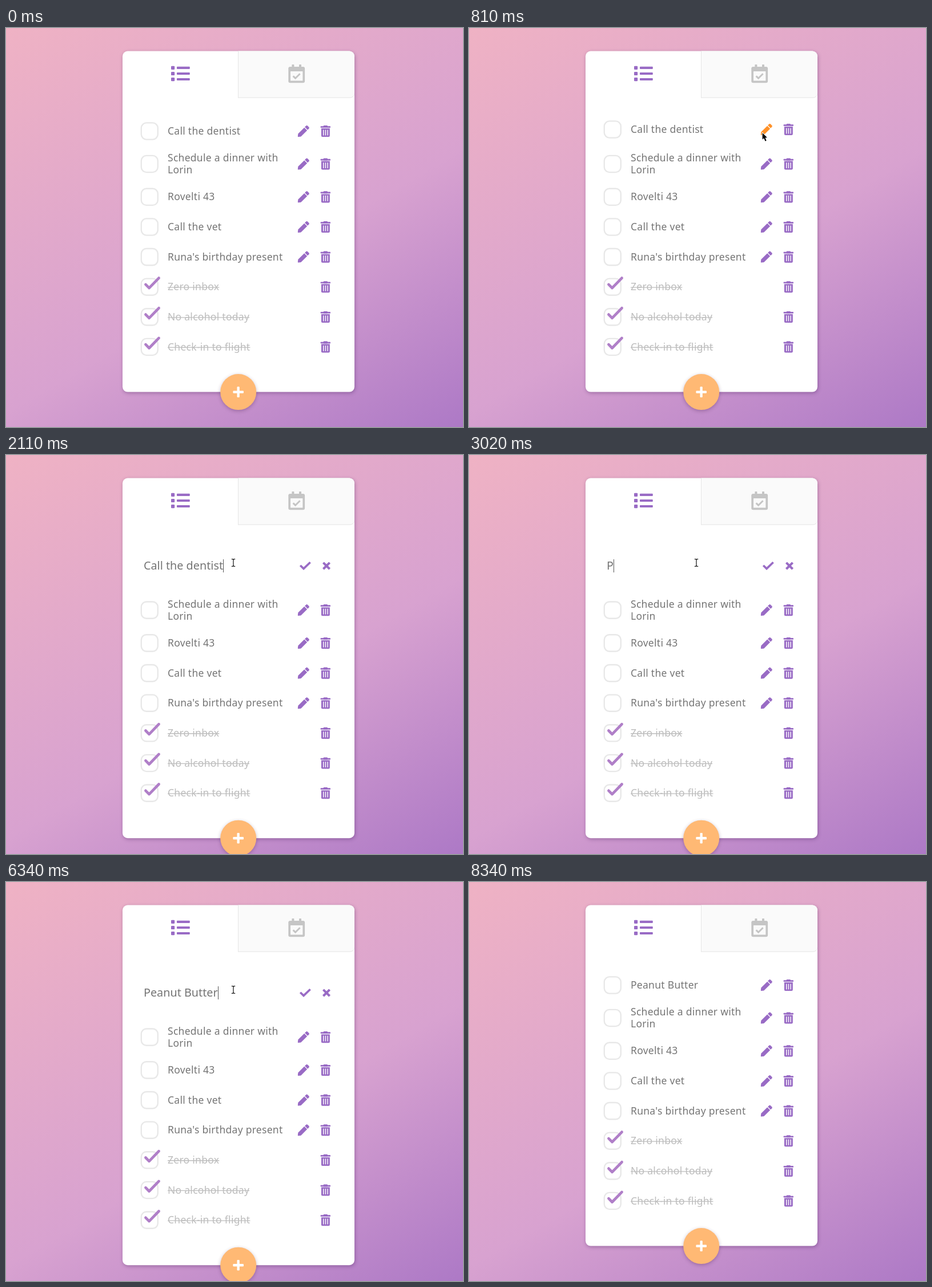
An HTML page with a canvas that plays this animation: 800x700 px, repeating every 9110 ms.

```html
<!DOCTYPE html>
<html lang="en">
<head>
<meta charset="utf-8">
<title>To-do list</title>
<style>
  html, body { margin: 0; width: 100%; height: 100%; overflow: hidden; }
  body { background: linear-gradient(150deg, #efb2c4, #d8a2d0 58%, #ad79c6); }
  canvas { display: block; width: 800px; height: 700px; }
</style>
</head>
<body>
<canvas id="stage" width="800" height="700"></canvas>
<script>
const ctx = document.getElementById('stage').getContext('2d');
const LOOP = 9110, EDIT_AT = 1070, SAVE_AT = 6750, EDIT_SHIFT = 33.6;
const PURPLE = [153, 107, 197], ORANGE = [255, 145, 40];
const ROW_FONT = '500 17.5px "Noto Sans", sans-serif';
const EDIT_FONT = '400 19.8px "Noto Sans", sans-serif';
const OLD_TASK = 'Call the dentist', NEW_TASK = 'Peanut Butter';
const KEY_TIMES = [3020, 3320, 3580, 4250, 4450, 4700, 4900, 5300, 5530, 5810, 5940, 6140, 6340];

const rows = [
  { y: 181, lines: [OLD_TASK] },
  { y: 238.5, lines: ['Schedule a dinner with', 'Lorin'] },
  { y: 296.3, lines: ['Rovelti 43'] },
  { y: 349, lines: ['Call the vet'] },
  { y: 401.6, lines: ["Runa's birthday present"] },
  { y: 454.2, lines: ['Zero inbox'], done: true },
  { y: 506.9, lines: ['No alcohol today'], done: true },
  { y: 559.5, lines: ['Check-in to flight'], done: true }
];

// Pointer tracks: [time, x, y]
const ARRIVE = [[100, 764, 696], [250, 690, 560], [400, 582, 340], [480, 536, 245],
  [550, 517, 198], [700, 514.5, 186], [1000, 513, 184]];
const TO_FIELD = [[1630, 513, 184], [1790, 478, 184], [1960, 418, 188], [2110, 398, 189]];
const LEAVE = [[7690, 398, 189], [7720, 405, 189.5], [7850, 452, 243], [8000, 536, 370],
  [8160, 640, 545], [8310, 736, 706]];

const rgb = c => `rgb(${c.map(Math.round).join(',')})`;
const mix = (a, b, k) => a.map((v, i) => v + (b[i] - v) * k);
const clamp = v => Math.max(0, Math.min(1, v));

// Smooth curve through timed points
function along(track, t) {
  const last = track.length - 1;
  if (t <= track[0][0]) return track[0].slice(1);
  if (t >= track[last][0]) return track[last].slice(1);
  let i = 0;
  while (t > track[i + 1][0]) i++;
  const a = track[i], b = track[i + 1], span = b[0] - a[0], u = (t - a[0]) / span;
  const slope = (k, axis) => {
    if (k === 0 || k === last) return 0;
    const p = track[k - 1], n = track[k + 1];
    return (n[axis] - p[axis]) / (n[0] - p[0]);
  };
  return [1, 2].map(axis => {
    const u2 = u * u, u3 = u2 * u;
    return (2 * u3 - 3 * u2 + 1) * a[axis] + (u3 - 2 * u2 + u) * span * slope(i, axis)
      + (3 * u2 - 2 * u3) * b[axis] + (u3 - u2) * span * slope(i + 1, axis);
  });
}

function pointer(t) {
  if (t < 100 || t >= 8340) return null;
  if (t < 1630) return along(ARRIVE, t);
  if (t < SAVE_AT) return along(TO_FIELD, t);
  return along(LEAVE, t);
}

function hovers(row, t) {
  const p = pointer(t);
  const half = row.lines.length > 1 ? 31.4 : 26.3;
  return p && p[0] > 204 && p[0] < 610 && Math.abs(p[1] - row.y) < half;
}

function lift(row, t) {
  const hits = [40, 55, 70].filter(lag => hovers(row, t - lag)).length;
  return hits;
}

function box(x, y, w, h, r, fill) {
  ctx.beginPath();
  ctx.roundRect(x, y, w, h, r);
  if (fill) { ctx.fillStyle = fill; ctx.fill(); }
}

function line(points, width, color, cap = 'round') {
  ctx.beginPath();
  points.forEach(p => ctx.lineTo(...p));
  Object.assign(ctx, { lineWidth: width, strokeStyle: color, lineCap: cap, lineJoin: cap === 'round' ? 'round' : 'miter' });
  ctx.stroke();
}

function shadow(color, blur, dx, dy) {
  Object.assign(ctx, { shadowColor: color, shadowBlur: blur, shadowOffsetX: dx, shadowOffsetY: dy });
}

function label(text, x, y, font, color, spacing = 0) {
  ctx.font = font;
  ctx.letterSpacing = spacing + 'px';
  ctx.fillStyle = color;
  ctx.fillText(text, x, y);
}

function textWidth(text, font, spacing = 0) {
  ctx.font = font;
  ctx.letterSpacing = spacing + 'px';
  return ctx.measureText(text).width;
}

function listIcon() {
  for (let i = 0; i < 3; i++) {
    box(289, 66.8 + i * 10.1, 6.2, 6.2, 1.2, rgb(PURPLE));
    box(299, 67.8 + i * 10.1, 22.8, 4.1, 1, rgb(PURPLE));
  }
}

function calendarIcon() {
  const grey = '#c5c5c5';
  box(494.3, 68, 28.8, 28.2, 3.2, grey);
  box(500.4, 64, 4, 6, 1, grey);
  box(513, 64, 4, 6, 1, grey);
  box(498, 76, 21.4, 16.5, 0.5, '#fafafa');
  line([[502.6, 84.4], [506.6, 88.2], [514.6, 80.2]], 3, grey, 'butt');
}

function pencil(y, color) {
  ctx.save();
  ctx.translate(510.8, y - 10);
  ctx.scale(20 / 512, 20 / 512);
  ctx.fillStyle = color;
  ctx.fill(new Path2D('M291 93L419 221 141 499 27 512C11 513-1 500 0 485L13 371Z' +
    'M498 74L438 14c-19-19-49-19-68 0l-57 57 128 128 57-57c19-19 19-49 0-68z'));
  ctx.restore();
}

function trash(y) {
  const color = rgb(PURPLE);
  box(555.6, y - 10, 7.4, 4, 1.3, color);
  box(550.6, y - 8.8, 17.4, 2.7, 0.7, color);
  box(551.9, y - 4.9, 14.9, 15, [0, 0, 2, 2], color);
  for (const x of [555, 558.7, 562.4]) box(x, y - 2.6, 1.4, 10.2, 0.6, '#fff');
}

function drawRow(row, t, editing) {
  const y = row.y + (editing ? EDIT_SHIFT : -lift(row, t));
  box(236.8, y - 14.6, 29, 29.2, 9);
  ctx.lineWidth = 2.4;
  ctx.strokeStyle = '#e8e8e8';
  ctx.stroke();
  const color = row.done ? '#bdbdbd' : '#757575';
  const first = y + 6 - (row.lines.length - 1) * 10.6;
  const lines = row === rows[0] && t >= SAVE_AT ? [NEW_TASK] : row.lines;
  lines.forEach((text, i) => label(text, 283, first + i * 21.2, ROW_FONT, color, 0.28));
  trash(y);
  if (row.done) {
    const w = textWidth(row.lines[0], ROW_FONT, 0.28);
    box(283, y + 0.3, w, 1.3, 0, color);
    line([[244.4, y - 4.3], [250.6, y + 2], [267.6, y - 15.6]], 4.7, '#b07fc8');
  } else {
    const hot = row === rows[0] && t < EDIT_AT ? clamp((t - 600) / 150) : 0;
    pencil(y, rgb(mix(PURPLE, ORANGE, hot)));
  }
}

function caret(x) {
  box(Math.round(x), 183, 1, 23, 0, '#555');
}

function drawEditor(t) {
  const typed = KEY_TIMES.filter(k => t >= k).length;
  const text = typed ? NEW_TASK.slice(0, typed) : OLD_TASK;
  const width = textWidth(text, EDIT_FONT);
  if (t >= 2440 && !typed) {
    const skip = t < 2490 ? textWidth('Call the ', EDIT_FONT) : 0;
    box(241 + skip, 183, width - skip, 23, 0, '#b4d5fe');
  }
  label(text, 241, 201.4, EDIT_FONT, '#757575');
  const blinkedOff = t >= 4120 && t < 4250;
  if ((t >= 2110 && t < 2440) || (typed && !blinkedOff)) caret(241 + width);

  const fade = clamp((t - 1145) / 115);
  line([[515.2, 193.8], [521, 199.4], [532.6, 188.2]], 3.6, rgb(mix(ORANGE, PURPLE, fade)), 'butt');
  line([[555.4, 188.8], [566.6, 200]], 4, rgb(PURPLE), 'butt');
  line([[566.6, 188.8], [555.4, 200]], 4, rgb(PURPLE), 'butt');
}

function drawCard(bottom) {
  ctx.save();
  shadow('rgba(70,30,90,.36)', 6, 1, 2);
  box(204, 40.5, 406, bottom - 40.5, 9, '#fff');
  ctx.restore();
  box(406, 40.5, 204, 82.3, [0, 9, 8, 0], '#e5e5e5');
  box(407, 40.5, 203, 81.3, [0, 9, 8, 0], '#fafafa');
  listIcon();
  calendarIcon();
}

function drawAdd(y) {
  ctx.save();
  shadow('rgba(70,30,70,.32)', 6, 0, 2);
  box(375.2, y - 31.5, 63, 63, 31.5, '#ffb974');
  ctx.restore();
  box(397.4, y - 2.1, 18.6, 4.3, 1.2, '#fff');
  box(404.5, y - 9.3, 4.3, 18.6, 1.2, '#fff');
}

function drawPointer(t) {
  const p = pointer(t);
  if (!p) return;
  ctx.save();
  ctx.translate(...p);
  if (t > 1630 && t < SAVE_AT && p[0] < 506) {
    const beam = [[[-3.2, -6.3], [-1, -6.3], [0, -5.4], [1, -6.3], [3.2, -6.3]],
      [[0, -5.4], [0, 5.4]],
      [[-3.2, 6.3], [-1, 6.3], [0, 5.4], [1, 6.3], [3.2, 6.3]]];
    beam.forEach(part => line(part, 1.3, '#222', 'butt'));
  } else {
    ctx.fillStyle = '#000';
    const arrow = [[0, 0], [0, 11.6], [2.6, 9.3], [4.9, 14.6], [7, 13.7], [4.8, 8.5], [8.3, 8.3], [0, 0]];
    line(arrow, 1.8, '#fff');
    ctx.fill();
  }
  ctx.restore();
}

function frame() {
  const t = performance.now() % LOOP;
  const editing = t >= EDIT_AT && t < SAVE_AT;
  const bottom = 638.6 + (editing ? EDIT_SHIFT : 0);
  ctx.clearRect(0, 0, 800, 700);
  drawCard(bottom);
  rows.slice(editing ? 1 : 0).forEach(row => drawRow(row, t, editing));
  if (editing) drawEditor(t);
  drawAdd(bottom);
  drawPointer(t);
  requestAnimationFrame(frame);
}
frame();
</script>
</body>
</html>
```
